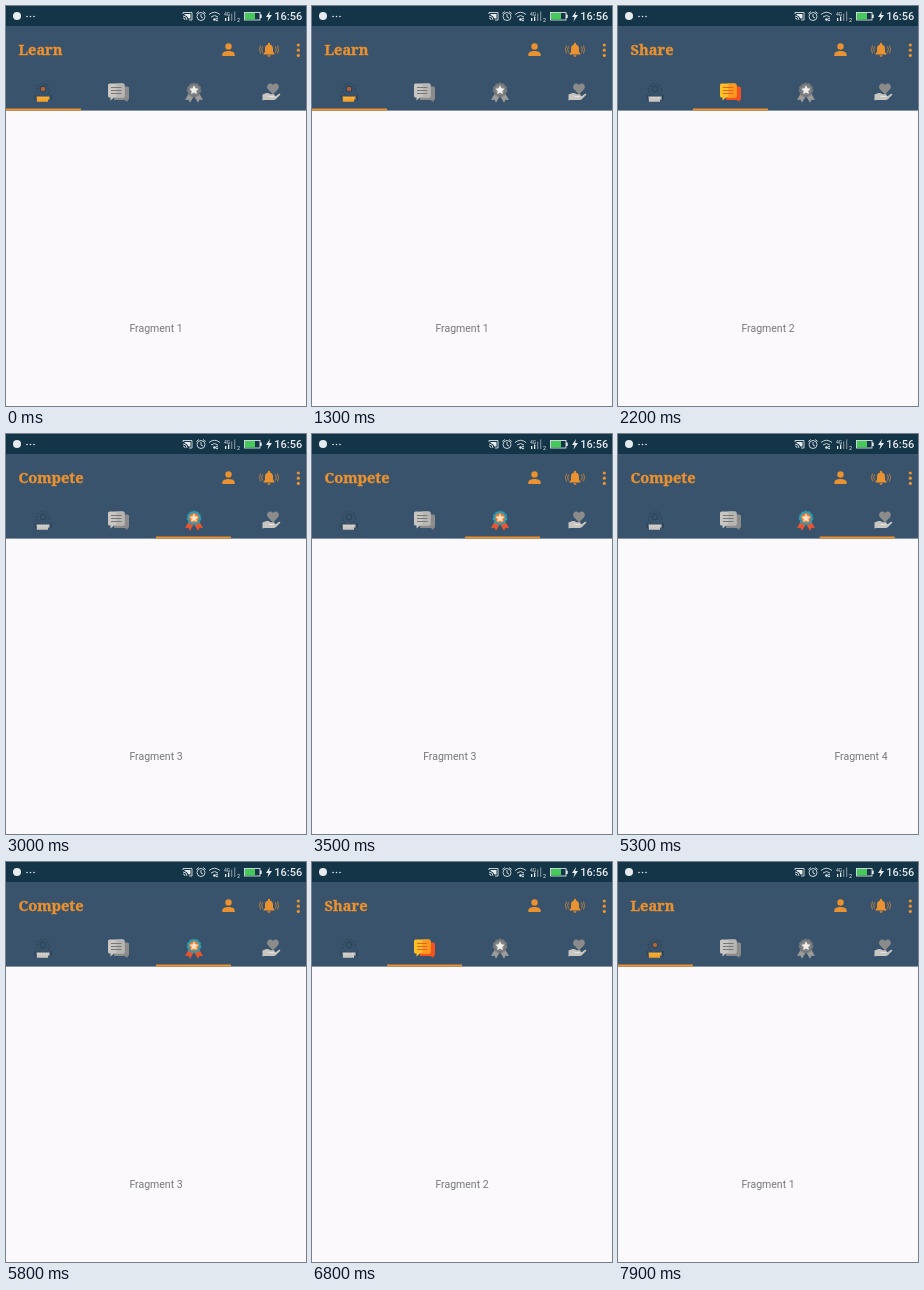
An HTML page for the animation above (8 s loop, 300 by 400 pixels).

```html
<!DOCTYPE html>
<html lang="en">
<head>
<meta charset="utf-8">
<title>Swiping tabs</title>
<style>
html, body { margin: 0; width: 100%; height: 100%; overflow: hidden; background: #fbf9fc; }
svg { display: block; width: 100%; height: 100%; }
text { font-family: Roboto, sans-serif; }
#title { font: bold 14.6px "Noto Serif", serif; fill: #ea9130; stroke: #ea9130; stroke-width: .35; }
.page { font-size: 10.5px; text-anchor: middle; fill: #777779; }
.orange { fill: #ea9130; }
.line { fill: none; stroke: #dbe2e6; stroke-width: .9; }
.tab { --a: #c9c6c1; --b: #8b8b8b; --c: #f0efec; --d: #a6a5a3; }
#learn { --gear: #2d465a; --core: #38536b; }
#learn.on { --a: #f3a32c; --core: #b8602f; --c: #ffd27a; }
#share { --d: #77787a; --e: #b7b6b3; }
#share.on { --a: #fcc026; --b: #f4511e; --d: #e8632b; --e: #fb9a1c; }
#compete { --a: #9b9b9a; --b: #77797b; --d: #86888a; }
#compete.on { --a: #e9552f; --b: #2b9db4; --c: #ffe1c2; --d: #f2762e; }
#connect.on { --a: #fbc070; --b: #f4604f; --c: #f2a23c; }
</style>
</head>
<body>
<svg viewBox="0 0 300 400">
  <rect width="300" height="400" fill="#fbf9fc"/>
  <g id="pages"></g>
  <rect width="300" height="104.600" fill="#38536b"/>
  <rect width="300" height="20" fill="#143447"/>

  <!-- status bar -->
  <g fill="#e6ebee">
    <circle cx="11" cy="10" r="4"/>
    <circle cx="21" cy="10.500" r=".8"/><circle cx="24.500" cy="10.500" r=".8"/><circle cx="28" cy="10.500" r=".8"/>
    <path class="line" d="M177 8V6.500h9v7.500h-3M177 10a4 4 0 0 1 4 4M177 12a2 2 0 0 1 2 2"/>
    <path d="M178.500 8h6v4.500h-2a6 6 0 0 0-4-3.500z"/>
    <circle class="line" cx="195" cy="10.500" r="4"/>
    <path class="line" d="M195 8v3l2 1M190.300 7.500l2.500-2M199.700 7.500l-2.500-2"/>
    <path class="line" d="M203 8.500q5.500-4.500 11 0M205 11q3.500-3 7 0"/>
    <circle cx="208.500" cy="13.500" r="1.300"/>
    <path d="M211 11.500l1.300 1.700h-2.600zM211 15.500l1.300-1.500h-2.600z"/>
    <text x="218" y="9.500" font-size="5">4G</text>
    <path d="M219 12h1.300v3H219zM222 10.500h1.300V15H222z"/>
    <path fill="#71848f" d="M225 7.500h1.300V15H225zM228 5.500h1.300V15H228z"/>
    <text x="231" y="16" font-size="5.500">2</text>
    <rect class="line" x="238.500" y="6.500" width="15.500" height="7.500"/>
    <rect x="254" y="8.500" width="1.700" height="3.500"/>
    <rect x="239" y="7" width="10" height="6.500" fill="#45c95a"/>
    <path d="M264 5l-4 6h2.500l-1 4.500 4.500-6.500h-2.800z"/>
    <text x="268.300" y="14.200" font-size="11" font-weight="500">16:56</text>
  </g>

  <!-- toolbar -->
  <text id="title" x="12.500" y="49"></text>
  <g class="orange">
    <circle cx="222.500" cy="40.500" r="3.200"/>
    <path d="M216.300 50v-1.500c0-2.400 3-3.500 6.200-3.500s6.200 1.100 6.200 3.500V50z"/>
    <path d="M257.500 48.500v-1l1.500-1.500v-3.500c0-2.300 1.400-3.700 3-4.100v-.7a1 1 0 0 1 2 0v.7c1.700.4 3 1.900 3 4.100V46l1.500 1.500v1z"/>
    <path d="M261.500 49.300h3a1.500 1.500 0 0 1-3 0z"/>
    <path fill="none" stroke="#ea9130" stroke-width=".7" d="M256.500 40.500q-1.600 3 0 6M254.500 39.500q-2 4 0 8M269.500 40.500q1.600 3 0 6M271.500 39.500q2 4 0 8"/>
    <circle cx="292.300" cy="39" r="1.600"/><circle cx="292.300" cy="44.200" r="1.600"/><circle cx="292.300" cy="49.400" r="1.600"/>
  </g>

  <!-- tabs -->
  <g class="tab" id="learn">
    <circle cx="37" cy="84" r="6.500" fill="none" stroke="var(--gear)" stroke-width="1.200" stroke-dasharray="1.600 1.800"/>
    <circle cx="37" cy="83" r="2.800" fill="var(--core)" stroke="var(--gear)" stroke-width="1.200"/>
    <path fill="var(--gear)" d="M28.500 89h2v5h-2zM44 89h2v5h-2z"/>
    <path fill="var(--a)" d="M30.500 90.500h13v3h-1.500v2.300H31z"/>
    <path stroke="var(--c)" stroke-width=".6" d="M33 91v1.500M35.500 91v1.500M38 91v1.500M40.500 91v1.500"/>
  </g>
  <g class="tab" id="share">
    <path fill="var(--b)" d="M108 80.500h13.500q1.500 0 1.500 1.500v10.500q0 1.500-1.500 1.500v2l-2.800-2H108z"/>
    <path fill="var(--a)" d="M103.500 77.500H117q1.500 0 1.500 1.500v11q0 1.500-1.500 1.500h-9l-3.500 3V91.500h-1q-1.500 0-1.500-1.500V79q0-1.500 1.500-1.500z"/>
    <path fill="var(--e)" d="M110.500 77.500H117q1.500 0 1.500 1.500v11q0 1.500-1.500 1.500h-6.500z"/>
    <path stroke="var(--d)" stroke-width="1" d="M105 81.500h10.500M105 84.500h10.500M105 87.500h10.500"/>
  </g>
  <g class="tab" id="compete">
    <path fill="var(--a)" d="M183 87l-4 7 3.500-.3 1.500 3 4-6.700zM193 87l4 7-3.500-.3-1.500 3-4-6.700z"/>
    <circle cx="188" cy="84" r="6.400" fill="var(--b)" stroke="var(--b)" stroke-width="1.800" stroke-dasharray="2.600 .9"/>
    <circle cx="188" cy="84" r="4.800" fill="var(--d)"/>
    <path fill="var(--c)" d="M188 79.300l1.400 3 3.200.4-2.400 2.200.7 3.200-2.900-1.600-2.900 1.600.7-3.200-2.400-2.200 3.200-.4z"/>
  </g>
  <g class="tab" id="connect">
    <path fill="var(--b)" d="M267 88.500l-5-5.200c-1.600-2-.9-5.600 2-5.900 1.300-.1 2.400.6 3 1.700.6-1.100 1.700-1.800 3-1.700 2.900.3 3.600 3.900 2 5.900z"/>
    <path fill="var(--a)" d="M256.500 88.500l4-1.500q2-.5 4 1.300h3.500q1.500.7.500 2h-3l4.500-.3 3-2.300q1.500-.3 1.300 1l-4.300 4.300q-1 1-2.500 1H258l-1.500.5z"/>
    <path fill="none" stroke="var(--c)" stroke-width=".7" d="M262.500 90.500h5.500"/>
  </g>
  <rect id="bar" class="orange" y="102.500" width="75" height="2.100"/>
</svg>
<script>
const LOOP = 8000, DRAG = 160, SETTLE = 350;
const names = ["Learn", "Share", "Compete", "Connect"];
// release time, from page, to page, share dragged by the finger
const swipes = [
  [1500, 0, 1, .3],
  [2600, 1, 2, .3],
  [3600, 2, 3, .28],
  [5300, 3, 2, .3],
  [6300, 2, 1, .48],
  [7300, 1, 0, .12]
];
const $ = id => document.getElementById(id);
const clamp = x => Math.min(1, Math.max(0, x));
const tabs = [...document.querySelectorAll(".tab")];

$("pages").innerHTML = names.map((_, i) =>
  `<text class="page" y="325.500">Fragment ${i + 1}</text>`).join("");
const pages = [...$("pages").children];

function state(t) {
  let pos = 0, page = 0;
  for (const [release, from, to, drag] of swipes) {
    if (t < release - DRAG) break;
    const pull = drag * clamp((t - release + DRAG) / DRAG) ** 2;
    const rest = (1 - clamp((t - release) / SETTLE)) ** 5;
    const p = t < release ? pull : 1 - (1 - drag) * rest;
    pos = from + (to - from) * p;
    page = t < release ? from : to;
  }
  return { pos, page };
}

function draw() {
  const { pos, page } = state(performance.now() % LOOP);
  $("title").textContent = names[page];
  $("bar").setAttribute("x", 75 * pos);
  tabs.forEach((tab, i) => tab.classList.toggle("on", i === page));
  pages.forEach((text, i) => text.setAttribute("x", 150 + 300 * (i - pos)));
  requestAnimationFrame(draw);
}
draw();
</script>
</body>
</html>
```
